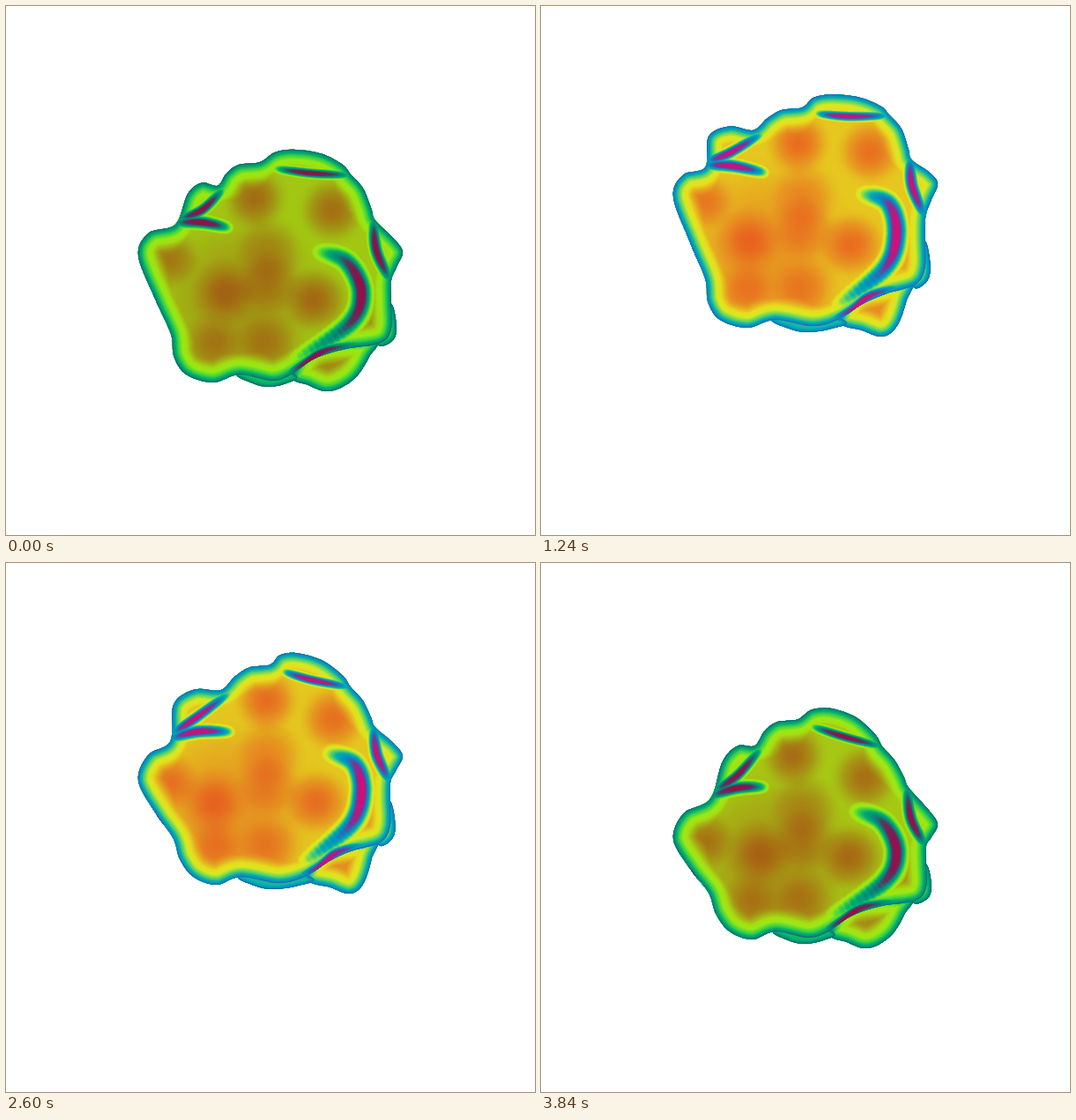
Write an HTML page with a canvas that moves like this. It is 600x600 px and loops after 3880 ms.

```html
<!DOCTYPE html>
<html lang="en">
<head>
<meta charset="utf-8">
<title>Blob</title>
<style>
html, body { margin: 0; width: 100%; height: 100%; overflow: hidden; background: #fff; }
canvas { display: block; width: 600px; height: 600px; }
</style>
</head>
<body>
<canvas id="stage" width="600" height="600"></canvas>
<script>
const LOOP = 3880, STEP = 40;
const X0 = 145, Y0 = 158, W = 310, H = 284;

const stage = document.getElementById('stage').getContext('2d');
const buffer = document.createElement('canvas');
buffer.width = W;
buffer.height = H;
const g = buffer.getContext('2d', { willReadFrequently: true });

const points = text => text.split(' ').map(p => p.split(',').map(Number));

const body = points('150,285 162,259 192,249 206,214 222,201 240,204 250,190 264,180 '
  + '288,177 305,166 328,163 358,168 382,181 391,192 405,208 414,230 419,244 440,265 '
  + '450,280 443,297 437,312 437,335 437,366 425,382 385,389 350,400 325,417 303,425 '
  + '265,418 235,427 205,418 191,398 187,372 170,335');

// Parts behind the body, with their highest facing level.
const lobes = [
  { top: .66, outline: points('437,338 443,365 438,380 422,384 422,350') },
  { top: .9, outline: points('418,380 412,398 398,420 380,433 362,437 343,430 325,420 350,385') },
  { top: .5, outline: points('262,417 280,428 298,432 318,428 330,420 300,405') }
];

// Dark valleys across the body.
const creases = [
  { width: 13, line: points('352,278 386,290 403,325 388,362 322,405') },
  { width: 7, line: points('412,382 365,390 338,406 314,422') },
  { width: 5, line: points('155,308 172,345 190,392') },
  { width: 6, line: points('304,184 345,190 394,193') },
  { width: 8, line: points('188,247 222,246 254,252') },
  { width: 7, line: points('194,243 222,232 248,206') },
  { width: 8, line: points('417,238 420,278 438,316') }
];

// Bright areas: x, y, radius, strength.
const spots = [
  [265, 335, 115, .09], [282, 218, 40, .18], [370, 232, 42, .17], [185, 288, 38, .14],
  [248, 325, 42, .12], [298, 315, 42, .09], [352, 333, 42, .17], [235, 385, 40, .11],
  [295, 385, 44, .11], [298, 277, 45, .09], [423, 355, 26, .15]
];

// Soft local pushes, each with a part that rises and returns and a part that swings over.
const pushes = [
  { at: [165, 285], reach: 55, rise: [0, 0], swing: [0, 30] },
  { at: [205, 215], reach: 35, rise: [-20, -2], swing: [0, 8] },
  { at: [275, 200], reach: 45, rise: [15, 0], swing: [4, 0] },
  { at: [390, 205], reach: 50, rise: [4, -4], swing: [-4, 17] },
  { at: [445, 280], reach: 40, rise: [0, -15], swing: [0, 16] },
  { at: [438, 350], reach: 40, rise: [-2, -10], swing: [0, 2] },
  { at: [355, 430], reach: 45, rise: [28, 0], swing: [3, 0] },
  { at: [205, 410], reach: 40, rise: [0, 0], swing: [9, 0] },
  { at: [365, 285], reach: 32, rise: [14, -4], swing: [2, 2] },
  { at: [245, 330], reach: 35, rise: [-16, 5], swing: [0, 3] }
];

// Facing level, then red, green, blue.
const ramp = [
  [0, 150, 100, 80], [.08, 190, 30, 110], [.17, 208, 14, 122], [.26, 130, 50, 150],
  [.36, 5, 135, 195], [.48, 0, 172, 178], [.58, 95, 212, 100], [.68, 215, 232, 32],
  [.76, 230, 222, 30], [.88, 230, 152, 32], [1, 232, 98, 32]
];
const lut = Array.from({ length: 256 }, (_, i) => {
  const v = i / 255;
  const k = Math.max(1, ramp.findIndex(r => r[0] >= v));
  const a = ramp[k - 1], b = ramp[k];
  const u = (v - a[0]) / (b[0] - a[0]);
  return [1, 2, 3].map(c => a[c] + (b[c] - a[c]) * u);
});

const liftAt = t => 66 * (1 - Math.abs(t / 1920 - 1) ** 2.6);
const riseAt = t => Math.sin(Math.PI * t / LOOP);
const swingAt = t => .4 + .75 * Math.cos(2 * Math.PI * (t - 3350) / 5200);

const gray = v => {
  const c = Math.round(255 * Math.max(0, Math.min(1, v)));
  return `rgb(${c},${c},${c})`;
};

function warper(t) {
  const rise = riseAt(t), swing = swingAt(t);
  return ([x, y]) => {
    let dx = 0, dy = 0;
    for (const p of pushes) {
      const w = Math.exp(-((x - p.at[0]) ** 2 + (y - p.at[1]) ** 2) / p.reach ** 2);
      dx += w * (rise * p.rise[0] + swing * p.swing[0]);
      dy += w * (rise * p.rise[1] + swing * p.swing[1]);
    }
    return [x + dx, y + dy];
  };
}

function closedPath(p) {
  const n = p.length, path = new Path2D();
  path.moveTo(p[0][0], p[0][1]);
  for (let i = 0; i < n; i++) {
    const a = p[(i + n - 1) % n], b = p[i], c = p[(i + 1) % n], d = p[(i + 2) % n];
    path.bezierCurveTo(b[0] + (c[0] - a[0]) / 6, b[1] + (c[1] - a[1]) / 6,
      c[0] - (d[0] - b[0]) / 6, c[1] - (d[1] - b[1]) / 6, c[0], c[1]);
  }
  path.closePath();
  return path;
}

function pointOn(p, s) {
  const n = p.length - 1, x = s * n, i = Math.min(n - 1, Math.floor(x)), u = x - i;
  const at = k => p[Math.max(0, Math.min(n, k))];
  const a = at(i - 1), b = at(i), c = at(i + 1), d = at(i + 2);
  return [0, 1].map(k => b[k] + u / 2 * (c[k] - a[k]
    + u * (2 * a[k] - 5 * b[k] + 4 * c[k] - d[k] + u * (3 * (b[k] - c[k]) + d[k] - a[k]))));
}

// Nested strokes turn the distance from the outline into a facing level.
function drawEdge(path) {
  for (let d = 30; d > 0; d--) {
    g.lineWidth = 2 * d;
    g.strokeStyle = gray(.22 + .135 * Math.sqrt(d - .5));
    g.stroke(path);
  }
}

// A Gaussian dip along a line, fading out at both ends.
function drawCrease(line, width) {
  const n = 48;
  const dots = Array.from({ length: n + 1 }, (_, i) =>
    [...pointOn(line, i / n), .87 * Math.sin(Math.PI * (i + .01) / (n + .02)) ** .45]);
  for (let v = .97; v > .1; v -= .025) {
    g.beginPath();
    for (const [x, y, depth] of dots) {
      if (depth <= 1 - v) continue;
      const r = width * Math.sqrt(Math.log(depth / (1 - v)));
      g.moveTo(x + r, y);
      g.arc(x, y, r, 0, 7);
    }
    g.fillStyle = gray(v);
    g.fill();
  }
}

function drawSpot([x, y], r, strength) {
  const grad = g.createRadialGradient(x, y, 0, x, y, r);
  for (let u = 0; u <= 1; u += .125) {
    grad.addColorStop(u, `rgba(255,255,255,${strength * (1 - u * u) ** 2})`);
  }
  g.fillStyle = grad;
  g.fillRect(x - r, y - r, 2 * r, 2 * r);
}

function drawPart(outline, top, addLight, addDark) {
  const path = closedPath(outline);
  g.save();
  g.clip(path);
  g.fillStyle = gray(top);
  g.fill(path);
  g.globalCompositeOperation = 'lighter';
  addLight?.();
  g.globalCompositeOperation = 'darken';
  drawEdge(path);
  addDark?.();
  g.restore();
}

function colorize(t) {
  const glow = Math.abs(Math.sin(2 * Math.PI * t / LOOP));
  const red = .7 + .333 * glow, blue = .6 + .44 * glow;
  const img = g.getImageData(0, 0, W, H), px = img.data;
  for (let i = 0; i < px.length; i += 4) {
    if (!px[i + 3]) continue;
    const c = lut[px[i]];
    px[i] = c[0] * red;
    px[i + 1] = c[1];
    px[i + 2] = c[2] * blue;
  }
  g.putImageData(img, 0, 0);
}

function draw(t) {
  const warp = warper(t);
  g.setTransform(1, 0, 0, 1, 0, 0);
  g.clearRect(0, 0, W, H);
  g.translate(-X0, -Y0);
  g.lineJoin = 'round';

  for (const { outline, top } of lobes) drawPart(outline.map(warp), top);
  drawPart(body.map(warp), .8,
    () => spots.forEach(([x, y, r, strength]) => drawSpot(warp([x, y]), r, strength)),
    () => creases.forEach(c => drawCrease(c.line.map(warp), c.width)));

  colorize(t);
  stage.fillStyle = '#fff';
  stage.fillRect(0, 0, 600, 600);
  stage.drawImage(buffer, X0, Y0 - Math.round(liftAt(t)));
}

const start = performance.now();
let last = -1;
function tick() {
  const t = Math.floor(Math.max(0, performance.now() - start) % LOOP / STEP) * STEP;
  if (t !== last) draw(last = t);
  requestAnimationFrame(tick);
}
tick();
</script>
</body>
</html>
```
